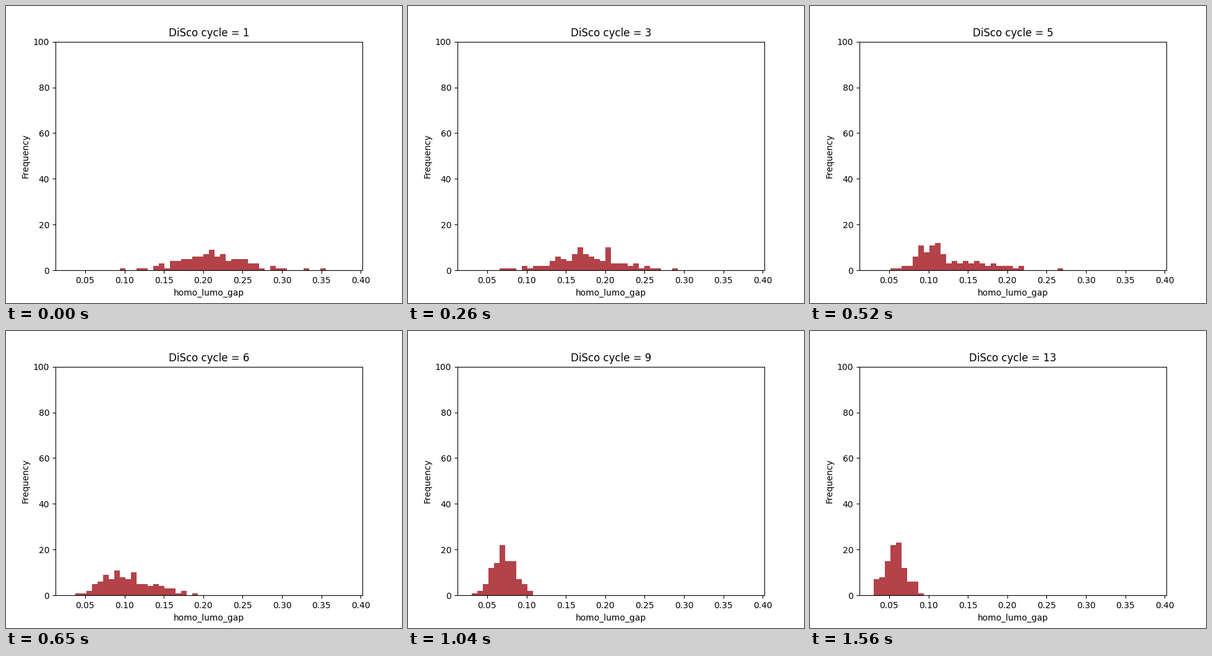
A matplotlib script for the animation above (1.69 s loop, 640 px wide and 480 px high).

```python
import numpy as np
import matplotlib.pyplot as plt
from matplotlib.animation import FuncAnimation

plt.rcParams["font.family"] = "DejaVu Sans"

BINS = 50
SAMPLES = 100
CYCLES = 13
LOW, HIGH = 0.03007, 0.38437
RED = "#b34249"

# The gap distribution drifts down and narrows through these key cycles.
KEYS = [1, 3, 5, 7, 9, 13]
MEDIAN = [0.214, 0.174, 0.115, 0.078, 0.070, 0.056]
BELOW = [0.044, 0.043, 0.026, 0.018, 0.013, 0.011]
ABOVE = [0.052, 0.042, 0.057, 0.025, 0.016, 0.014]

edges = np.linspace(LOW, HIGH, BINS + 1)


def histogram(cycle):
    """Counts of a two-sided normal distribution, seeded by the cycle."""
    median, below, above = (np.interp(cycle, KEYS, values)
                            for values in (MEDIAN, BELOW, ABOVE))
    rng = np.random.default_rng(cycle)
    # Averaging sorted draws keeps the shape while calming the noise.
    z = np.sort(rng.standard_normal((3, SAMPLES)), axis=1).mean(axis=0)
    gaps = median + np.where(z < 0, below, above) * z
    return np.histogram(np.clip(gaps, LOW, HIGH), edges)[0]


fig, ax = plt.subplots(figsize=(6.4, 4.8), dpi=100)
bars = ax.bar(edges[:-1], np.zeros(BINS), width=np.diff(edges),
              align="edge", color=RED)
margin = 0.05 * (HIGH - LOW)
ax.set_xlim(LOW - margin, HIGH + margin)
ax.set_ylim(0, 100)
ax.set_xlabel("homo_lumo_gap")
ax.set_ylabel("Frequency")
title = ax.set_title("")


def update(frame):
    cycle = frame + 1
    for bar, count in zip(bars, histogram(cycle)):
        bar.set_height(count)
    title.set_text(f"DiSco cycle = {cycle}")
    return [*bars, title]


anim = FuncAnimation(fig, update, frames=CYCLES, interval=130,
                     repeat=True, repeat_delay=0, blit=False)
plt.show()
```
